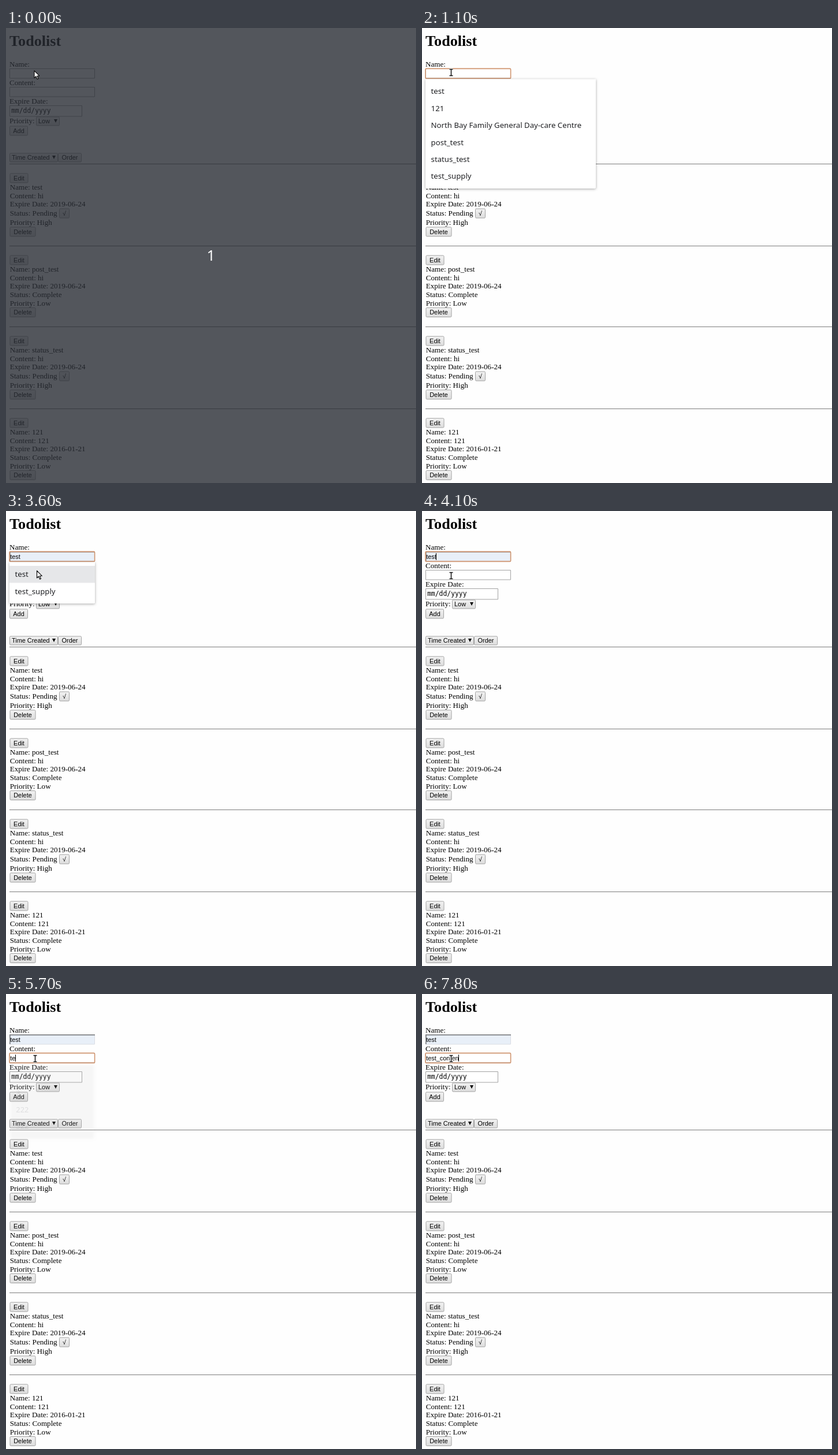
An HTML page with a canvas that plays this animation: 710 px wide and 788 px high, repeating every 8 s.

```html
<!DOCTYPE html>
<html lang="en">
<head>
<meta charset="utf-8">
<title>Todolist</title>
<style>
html, body { margin: 0; width: 710px; height: 788px; overflow: hidden; background: #fefefe; }
canvas { display: block; }
</style>
</head>
<body>
<canvas id="stage" width="710" height="788"></canvas>
<script>
const ctx = document.getElementById('stage').getContext('2d');
const LOOP = 8000, STEP = 100;
const SERIF = '13.1px "Liberation Serif", serif';
const SANS = '10.92px "Liberation Sans", sans-serif';
const MONO = '11.4px "DejaVu Sans Mono", monospace';
const MENU = '500 13.2px "Noto Sans", sans-serif';

const todos = [
  { top: 235, name: 'test', content: 'hi', date: '2019-06-24', pending: true, priority: 'High' },
  { top: 377, name: 'post_test', content: 'hi', date: '2019-06-24', priority: 'Low' },
  { top: 517, name: 'status_test', content: 'hi', date: '2019-06-24', pending: true, priority: 'High' },
  { top: 659, name: '121', content: '121', date: '2016-01-21', priority: 'Low' },
];

const nameMenus = {
  all: { width: 295, items: ['test', '121', 'North Bay Family General Day-care Centre', 'post_test', 'status_test', 'test_supply'] },
  t: { width: 314, items: ['test', 'Kei U Harbor Hall General Out-patient Clinic', 'test_supply', 'Kei U'] },
  te: { width: 148, items: ['test', 'test_supply'] },
};
const contentMenu = { width: 148, items: ['121', '3', '222', '322'] };

// Value of the last [time, value] pair reached at time t.
const at = (t, keys) => keys.reduce((value, [start, next]) => t >= start ? next : value, keys[0][1]);

const nameText = [[0, ''], [2300, 't'], [2500, 'te'], [2600, 'tes'], [2800, 'test']];
const contentText = [[0, ''], [5500, 't'], [5700, 'te'], [5800, 'tes'], [6000, 'test'], [6900, 'test_c'],
  [7100, 'test_co'], [7200, 'test_con'], [7500, 'test_cont'], [7600, 'test_conte'], [7800, 'test_conten']];
const focus = [[0, ''], [600, 'name'], [4200, 'content']];
const caret = [[0, false], [600, true], [1100, false], [1700, true], [3300, false], [3800, true],
  [4900, false], [5500, true], [6600, false], [6900, true]];
const nameMenu = [[0, 'all'], [2300, 't'], [2500, 'te']];
const nameFade = [[0, 0], [1000, .5], [1100, 1], [3800, .8], [3900, .4], [4000, .1], [4100, 0]];
const contentFade = [[0, 0], [4200, .5], [4300, 1], [5500, .8], [5600, .4], [5700, .1], [5800, 0]];
const pointer = [[0, ['arrow', 49, 74]], [300, ['beam', 50, 77]], [3300, ['beam', 50, 81]], [3400, ['arrow', 51, 91]],
  [3500, ['arrow', 52, 98]], [3600, ['arrow', 53.5, 103.5]], [3900, ['arrow', 53, 105]], [4000, ['beam', 52, 109]],
  [4100, ['beam', 50, 112]]];

function text(string, x, y, font = SERIF, color = '#000', align = 'left') {
  ctx.font = font;
  ctx.fillStyle = color;
  ctx.textAlign = align;
  ctx.fillText(string, x, y);
}

function rect(x, y, w, h, color) {
  ctx.fillStyle = color;
  ctx.fillRect(x, y, w, h);
}

function box(x, y, w, h, fill, stroke, radius = 0, line = 1) {
  ctx.beginPath();
  ctx.roundRect(x + .5, y + .5, w - 1, h - 1, radius);
  ctx.fillStyle = fill;
  ctx.fill();
  ctx.strokeStyle = stroke;
  ctx.lineWidth = line;
  ctx.stroke();
}

function polygon(points) {
  ctx.beginPath();
  points.forEach(([x, y]) => ctx.lineTo(x, y));
  ctx.closePath();
}

function control(x, y, w, h) {
  const shade = ctx.createLinearGradient(0, y, 0, y + h);
  shade.addColorStop(0, '#f3f3f3');
  shade.addColorStop(1, '#dcdcdc');
  box(x, y, w, h, shade, '#a2a2a2', 1.5);
}

function button(label, x, y, w, h = 17) {
  control(x, y, w, h);
  text(label, x + w / 2, y + h / 2 + 3.8, SANS, '#000', 'center');
}

function select(label, x, y, w) {
  control(x, y, w, 16);
  text(label, x + 4, y + 11.8, SANS);
  const right = x + w - 4, top = y + 4.5;
  polygon([[right - 6, top], [right, top], [right - 3, top + 6]]);
  ctx.fill();
}

function field(y, value, focused, showCaret, filled) {
  box(6, y, 148, 17.5, filled ? '#e8eff8' : '#fff', filled ? '#d9dde3' : '#a3a3a3');
  if (filled) {
    rect(6, y, 148, 1.6, '#77797c');
    rect(6, y, 1.6, 17, '#77797c');
  }
  if (focused) {
    ctx.strokeStyle = '#cf946f';
    ctx.lineWidth = 1.6;
    ctx.beginPath();
    ctx.roundRect(6, y + .4, 147.6, 17, 1.5);
    ctx.stroke();
  }
  text(value, 7.2, y + 12.6, SANS);
  if (focused && showCaret) rect(Math.floor(7.2 + ctx.measureText(value).width), y + 3, 1, 12, '#000');
}

function menu({ width, items }, top, alpha, hovered) {
  if (!alpha) return;
  const height = items.length * 29.4 + 13;
  const scale = .97 + .03 * alpha;
  ctx.save();
  ctx.globalAlpha = alpha;
  ctx.translate(6 + width / 2, top + height / 2);
  ctx.scale(scale, scale);
  ctx.translate(-width / 2, -height / 2);
  ctx.shadowColor = 'rgba(0,0,0,.35)';
  ctx.shadowBlur = 4;
  ctx.shadowOffsetY = 1;
  ctx.beginPath();
  ctx.roundRect(0, 0, width, height, [0, 0, 2, 2]);
  ctx.fillStyle = '#fff';
  ctx.fill();
  ctx.shadowColor = 'transparent';
  if (hovered) rect(0, 6.5, width, 29.4, '#e6e7e9');
  items.forEach((item, i) => text(item, 9.6, 25.8 + i * 29.4, MENU, '#202124'));
  ctx.restore();
}

function todo({ top, name, content, date, pending, priority }) {
  const line = 14.75, shift = pending ? 1 : 0;
  let y = top + 44.8;
  rect(6, top, 704, 1, '#7c7c7c');
  button('Edit', 6.5, top + 16.5, 32);
  text('Name: ' + name, 6.7, y);
  text('Content: ' + content, 6.7, y += line);
  text('Expire Date: ' + date, 6.7, y += line);
  text('Status: ' + (pending ? 'Pending' : 'Complete'), 6.7, y += line + shift);
  if (pending) button('√', 92, y - 12.5, 18);
  text('Priority: ' + priority, 6.7, y += line + shift * 1.4);
  button('Delete', 6.5, y + 3.2, 45);
}

function drawPointer([shape, x, y]) {
  ctx.save();
  ctx.translate(x, y);
  ctx.lineJoin = 'round';
  if (shape === 'arrow') {
    polygon([[0, 0], [0, 12.5], [2.9, 9.8], [5, 14.6], [7, 13.7], [4.9, 9], [8.8, 8.8]]);
    ctx.fillStyle = '#fff';
    ctx.strokeStyle = '#111';
    ctx.lineWidth = 1.2;
    ctx.fill();
    ctx.stroke();
  } else {
    for (const [color, width] of [['#fff', 3.6], ['#111', 1.5]]) {
      ctx.strokeStyle = color;
      ctx.lineWidth = width;
      ctx.beginPath();
      for (const end of [-5.5, 5.5]) {
        ctx.moveTo(-2.5, end);
        ctx.lineTo(3.5, end);
      }
      ctx.moveTo(.5, -5.5);
      ctx.lineTo(.5, 5.5);
      ctx.stroke();
    }
  }
  ctx.restore();
}

function drawForm(t) {
  const active = at(t, focus), blink = at(t, caret);
  text('Todolist', 6, 31, 'bold 26.2px "Liberation Serif", serif');
  text('Name:', 6, 67);
  text('Content:', 6, 99);
  text('Expire Date:', 6, 131);
  text('Priority:', 6, 165.3);
  field(70, at(t, nameText), active === 'name', blink, t >= 3500);
  field(102, at(t, contentText), active === 'content', blink);
  box(6, 134, 126, 19.5, '#fff', '#a3a3a3');
  text('mm/dd/yyyy', 9, 147.3, MONO);
  select('Low', 52, 153.5, 41);
  button('Add', 6, 169.5, 32);
  select('Time Created', 6, 216.5, 84);
  button('Order', 90, 216.5, 41, 16);
}

function draw(t) {
  rect(0, 0, 710, 788, '#fefefe');
  drawForm(t);
  todos.forEach(todo);
  menu(nameMenus[at(t, nameMenu)], 88.5, at(t, nameFade), t >= 3500);
  menu(contentMenu, 120.5, at(t, contentFade));
  if (t < 300) {
    rect(0, 0, 710, 788, 'rgba(40,44,52,.8)');
    text('1', 355, 403, '25px "Noto Sans", sans-serif', '#fff', 'center');
  }
  drawPointer(at(t, pointer));
}

function tick(now) {
  draw(Math.floor(now % LOOP / STEP) * STEP);
  requestAnimationFrame(tick);
}
requestAnimationFrame(tick);
</script>
</body>
</html>
```
